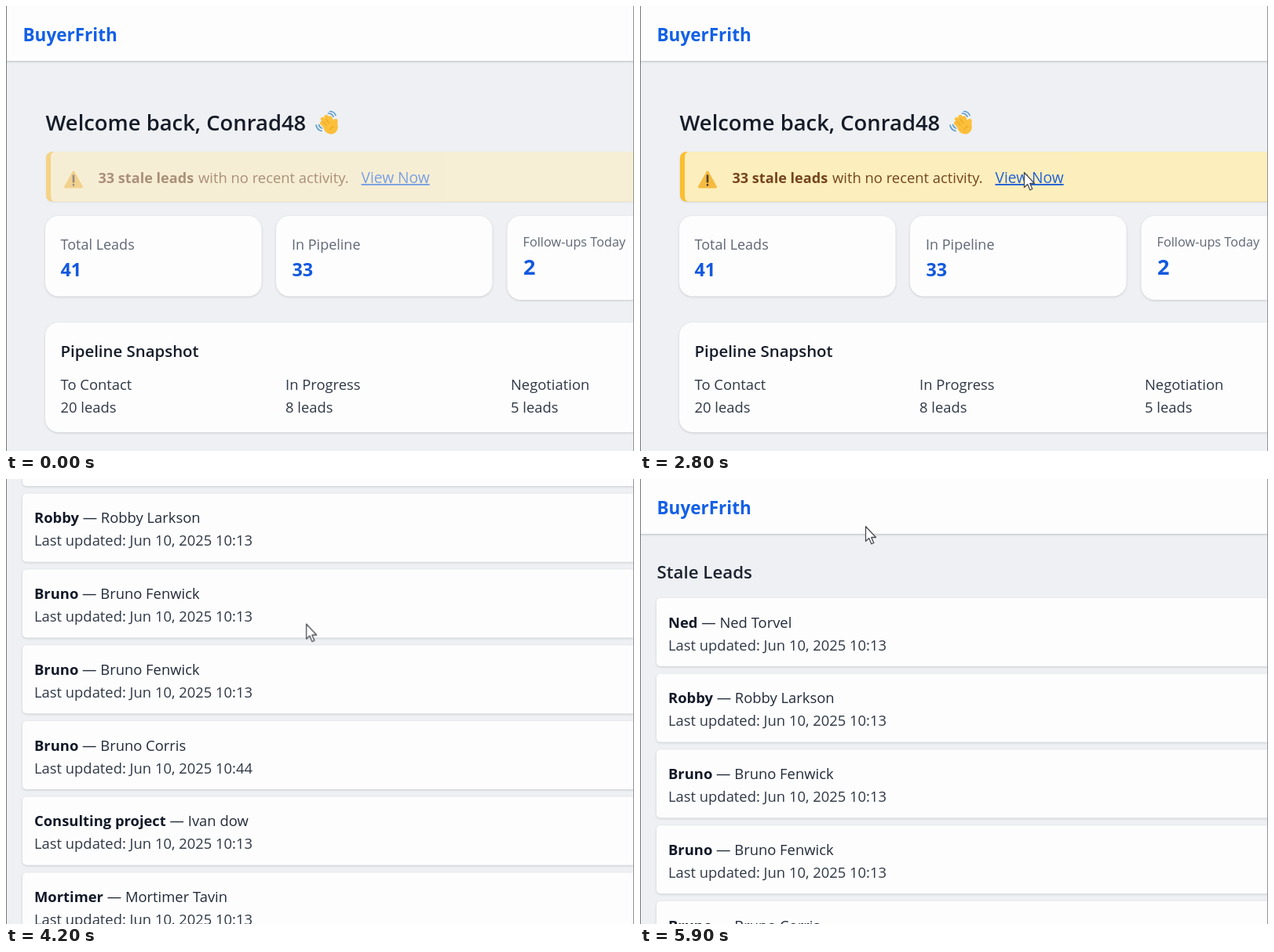
These frames come from a looping animation (800x568 px, 6 s). An HTML page:

```html
<!DOCTYPE html>
<html lang="en">
<head>
<meta charset="utf-8">
<title>Lead dashboard</title>
<style>
  html, body { margin: 0; width: 100%; height: 100%; overflow: hidden; background: #eef0f3; }
  svg { display: block; width: 100vw; height: 100vh; }
  text { font: 18.4px "Open Sans", "Noto Sans", sans-serif; fill: #2f3845; white-space: pre; }
  .brand { font-size: 22.5px; font-weight: 700; fill: #1360e6; }
  .h1 { font-size: 27.4px; font-weight: 600; fill: #151c28; }
  .h2 { font-size: 22.3px; font-weight: 600; fill: #1b2330; }
  .h3 { font-size: 20.4px; font-weight: 600; fill: #151c28; }
  .label { font-size: 18px; fill: #5f6774; }
  .small { font-size: 16.3px; fill: #5f6774; }
  .num { font-size: 23.4px; font-weight: 700; fill: #1259df; }
  .big { font-size: 27px; }
  .warn { fill: #74401a; }
  .link { font-size: 19.2px; fill: #1d5fd8; text-decoration: underline; }
  .name { fill: #222b39; }
  .bold { font-weight: 700; }
  .name .bold { fill: #111827; }
  .card { fill: #fdfdfe; filter: drop-shadow(0 1.5px 1.5px #00000026); }
  .bar { fill: #fdfdfe; filter: drop-shadow(0 1px 1.5px #00000038); }

  /* The script advances --t, so every animation follows one clock. */
  .anim {
    animation: 6s linear infinite paused;
    animation-delay: calc(var(--t, 0) * -1ms);
  }
  .step { animation-timing-function: step-end; }
  #page { animation-name: scroll; }
  #dash { animation-name: dash; }
  #list { animation-name: list; }
  #cursor { animation-name: move; }
  #arrow { animation-name: arrow; }
  #hand { animation-name: hand; }
  #banner {
    animation: pulse 2s cubic-bezier(.4, 0, .6, 1) infinite paused;
    animation-delay: calc(var(--t, 0) * -1ms - 1050ms);
  }

  @keyframes pulse { 0%, 100% { opacity: 1; } 50% { opacity: .55; } }
  @keyframes dash { 0% { visibility: visible; } 48.33%, 100% { visibility: hidden; } }
  @keyframes list { 0% { visibility: hidden; } 48.33%, 100% { visibility: visible; } }
  @keyframes hand {
    0% { visibility: hidden; }
    28.33% { visibility: visible; }
    44.99%, 100% { visibility: hidden; }
  }
  @keyframes arrow {
    0% { visibility: hidden; }
    23.33% { visibility: visible; }
    28.33% { visibility: hidden; }
    44.99%, 100% { visibility: visible; }
  }
  @keyframes scroll {
    0%, 58.333% { transform: translateY(0); }
    61.667% { transform: translateY(-2px); }
    63.333% { transform: translateY(-6px); }
    70% { transform: translateY(-230px); }
    75% { transform: translateY(-473px); }
    80%, 81.667% { transform: translateY(-640px); }
    91.667%, 100% { transform: translateY(0); }
  }
  @keyframes move {
    0%, 23.333% { transform: translate(790px, 330px); }
    28.333% { transform: translate(494px, 215px); }
    30%, 53.333% { transform: translate(489px, 212px); }
    55% { transform: translate(430px, 182px); }
    56.667%, 58.333% { transform: translate(397px, 173px); }
    63.333% { transform: translate(385px, 180px); }
    75% { transform: translate(380px, 188px); }
    83.333% { transform: translate(376px, 188px); }
    90% { transform: translate(330px, 118px); }
    93.333% { transform: translate(286px, 34px); }
    98.333%, 100% { transform: translate(287px, 60px); }
  }
</style>
</head>
<body>
<svg viewBox="0 0 800 568" preserveAspectRatio="none">
  <rect width="800" height="568" fill="#eef0f3"/>

  <g id="page" class="anim">
    <rect class="bar" x="-10" y="-20" width="820" height="90"/>
    <text class="brand" x="21.5" y="44.5">BuyerFrith</text>

    <g id="dash" class="anim step">
      <text class="h1" x="50.500" y="159">Welcome back, Conrad48</text>

      <g fill="none" stroke="#fbbf3a" stroke-width="5.2" stroke-linecap="round">
        <ellipse cx="413.5" cy="154" rx="6.5" ry="7.2" fill="#fbbf3a" transform="rotate(-35 413.5 154)"/>
        <path d="M411 158L402.500 149.500M411 154L403.500 144.500M414 151L408 141.500M417 152L413 143M419.500 155L420 146.500"/>
        <path d="M408 152L404 147.500M411.500 149.500L408 144.500M417.500 154Q414 154 413 158" stroke="#e39a22" stroke-width="1"/>
        <g stroke="#5f9fd0" stroke-width="1.7">
          <path d="M395 152Q396 158 402 159.500M398.500 151.500Q399.500 155 402.500 156M410.500 137Q415 137 417 141M412.500 134.500Q418 134.500 420 139.500"/>
        </g>
      </g>

      <g id="banner">
        <rect x="51" y="186" width="780" height="63.500" rx="8" fill="#fbbd2c" filter="drop-shadow(0 1px 1px #0002)"/>
        <path d="M831 186H61Q57 187 57 194V241.500Q57 248.500 61 249.500H831Z" fill="#fdeebc"/>
        <path d="M86 212L96.500 231H75.500Z" fill="#f6b93c" stroke="#f6b93c" stroke-width="3" stroke-linejoin="round"/>
        <path d="M86 216.500V224.500M86 228.300V228.600" stroke="#4b3b2c" stroke-width="2.600" stroke-linecap="round"/>
        <text class="warn bold" x="117.500" y="226" style="font-size:18.1px">33 stale leads</text>
        <text class="warn" x="245" y="226">with no recent activity.</text>
        <text class="link" x="452.500" y="226">View Now</text>
      </g>

      <rect class="card" x="50" y="268" width="275.500" height="102.500" rx="17"/>
      <text class="label" x="69.500" y="310.500">Total Leads</text>
      <text class="num" x="69.500" y="344.500">41</text>

      <rect class="card" x="344" y="268" width="275.500" height="102.500" rx="17"/>
      <text class="label" x="364" y="310.500">In Pipeline</text>
      <text class="num" x="364.500" y="344.500">33</text>

      <rect class="card" x="638.500" y="268" width="275.500" height="107" rx="17"/>
      <text class="small" x="658.500" y="307">Follow-ups Today</text>
      <text class="num big" x="659" y="343">2</text>

      <rect class="card" x="50" y="404" width="864" height="140" rx="17"/>
      <text class="h3" x="69.500" y="447.500">Pipeline Snapshot</text>
      <text x="69.500" y="489.500">To Contact</text>
      <text x="69.500" y="518.500">20 leads</text>
      <text x="356" y="489.500">In Progress</text>
      <text x="356" y="518.500">8 leads</text>
      <text x="643" y="489.500">Negotiation</text>
      <text x="643" y="518.500">5 leads</text>
    </g>

    <g id="list" class="anim step">
      <text class="h2" x="21.500" y="126.500">Stale Leads</text>
    </g>
  </g>

  <path d="M.5 0V568" stroke="#77797c"/>
  <path d="M799.500 0V568" stroke="#909296"/>

  <g id="cursor" class="anim" fill="#fff" stroke="#4a4d54" stroke-width="1.300" stroke-linejoin="round">
    <path id="arrow" class="anim step" d="M.5 .5V19.500L4.700 15.600L7.800 22.800L10.800 21.500L7.700 14.500H13.500Z"/>
    <g id="hand" class="anim step">
      <path d="M-.5 18.500V2.500Q-.5 0 1.700 0T4 2.500V10Q4.500 8.500 6.200 8.800Q8 9.200 8 11Q8.800 9.600 10.300 10.200Q11.700 10.800 11.600 12.500Q13.800 11.800 13.800 14.500V20Q13.500 23.500 11.500 25.500V29H.5V26.500Q-3 23.500-6.500 18.500Q-8 16-6.200 15Q-4.500 14.200-2.800 16.200Z"/>
      <path d="M4 10V16M8 11V16M11.600 12.500V16.500" fill="none"/>
    </g>
  </g>
</svg>

<script>
  const LOOP = 6000, TICK = 100;
  const FIRST_ROW = 152, ROW_STEP = 96.75;

  const leads = [
    ["Ned", "Ned Torvel"],
    ["Robby", "Robby Larkson"],
    ["Bruno", "Bruno Fenwick"],
    ["Bruno", "Bruno Fenwick"],
    ["Bruno", "Bruno Corris", "10:44"],
    ["Consulting project", "Ivan dow"],
    ["Mortimer", "Mortimer Tavin"],
    ["Edgar", "Edgar Kestrane"],
    ["Serena", "Serena Norvel"],
    ["Agnes", "Agnes Pellow"],
    ["Victor", "Victor Almsby"],
    ["Paula", "Paula Drennet"]
  ];

  const row = ([name, full, time = "10:13"], i) => `
    <g transform="translate(0 ${FIRST_ROW + i * ROW_STEP})">
      <rect class="card" x="21" width="800" height="87" rx="5"/>
      <text class="name" x="36" y="37.5"><tspan class="bold">${name}</tspan> — ${full}</text>
      <text x="36" y="66.5">Last updated: Jun 10, 2025 ${time}</text>
    </g>`;

  document.getElementById("list").insertAdjacentHTML("beforeend", leads.map(row).join(""));

  function tick() {
    const t = performance.now() % LOOP;
    document.documentElement.style.setProperty("--t", Math.floor(t / TICK) * TICK);
    requestAnimationFrame(tick);
  }
  tick();
</script>
</body>
</html>
```
